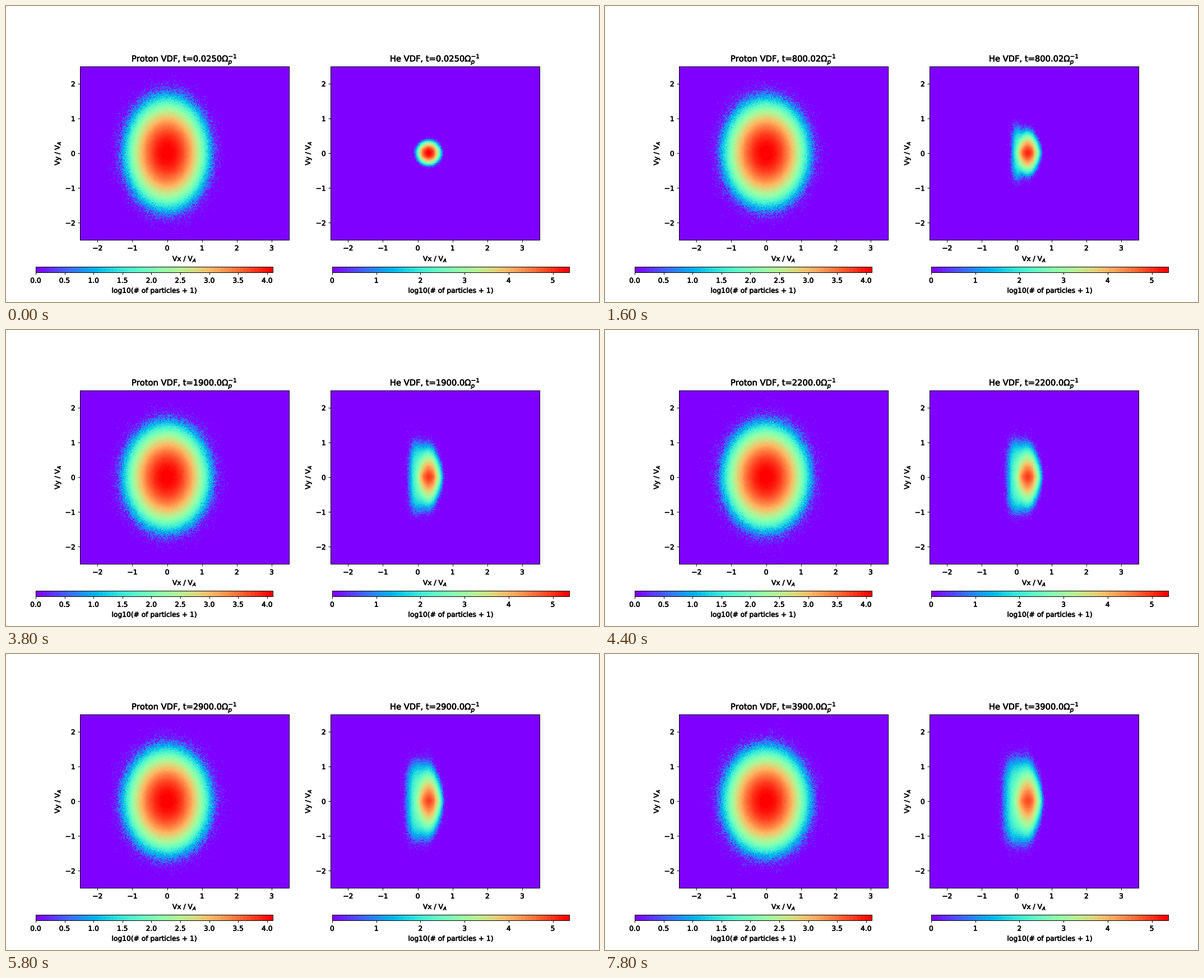
A matplotlib script for the animation above (8 s loop, 1058x529 px).

```python
import numpy as np
import matplotlib.pyplot as plt
from matplotlib import patheffects
from matplotlib.animation import FuncAnimation
from matplotlib.text import Text

W, H = 1058, 529
FRAMES, STEP_MS = 40, 200
BINS = 200
X_LIM, Y_LIM = (-2.5, 3.5), (-2.5, 2.5)

plt.rcParams.update({"font.family": "DejaVu Sans", "font.size": 10})


def centres(lo, hi):
    edges = np.linspace(lo, hi, BINS + 1)
    return (edges[:-1] + edges[1:]) / 2


VX, VY = np.meshgrid(centres(*X_LIM), centres(*Y_LIM))


def proton_density(t):
    """Bi-Maxwellian that relaxes slightly towards isotropy."""
    relax = 1 - np.exp(-t / 5)
    sx = 0.328 + 0.008 * relax
    sy = 0.440 - 0.022 * relax
    return 10**4.1 * np.exp(-VX**2 / (2 * sx**2) - VY**2 / (2 * sy**2))


def helium_density(t):
    """Drifting core that widens in vy and feeds a flat halo on its left."""
    u = VX - (0.315 + 0.0004 * t - 0.04 * VY**2 * min(t / 8, 1))
    sx = np.where(u > 0, 0.085 + 0.0004 * t, 0.085 + 0.0009 * t)
    spread = np.sqrt(0.0144 + 0.0012 * t)
    power = 1.4 + 0.6 * np.exp(-t / 5)
    peak = 10**5.375 / np.sqrt(1 + t / 4)
    core = peak * np.exp(-u**2 / (2 * sx**2) - (np.abs(VY) / spread) ** power)

    age = max(t, 0.1) / 39
    width = max(0.147 * age**0.45, 0.03)
    reach = 0.69 * age**0.26
    v = VX - (0.06 - 0.06 * VY**2)
    halo = 500 * (1 - np.exp(-t / 14)) * np.exp(
        -v**2 / (2 * width**2) - (np.abs(VY) / reach) ** 2.6)
    return core + halo


def log_counts(density, rng):
    return np.log10(rng.poisson(density) + 1)


class Panel:
    def __init__(self, name, density, left, bar_left, vmax, bar_ticks):
        self.name, self.density = name, density
        self.ax = fig.add_axes([left / W, 1 - 418.3 / H, 372.7 / W, 310.6 / H])
        self.image = self.ax.imshow(
            np.zeros((BINS, BINS)), extent=(*X_LIM, *Y_LIM), origin="lower",
            aspect="auto", interpolation="nearest", vmin=0, vmax=vmax,
            cmap=plt.get_cmap("rainbow", 64))
        self.ax.set_xticks(range(-2, 4))
        self.ax.set_yticks(range(-2, 3))
        self.ax.set_xlabel("Vx / V$_A$")
        self.ax.set_ylabel("Vy / V$_A$")
        self.title = self.ax.set_title("", fontsize=12)
        bar = fig.add_axes([bar_left, 0.1, 0.4, 0.02])
        fig.colorbar(self.image, cax=bar, orientation="horizontal",
                     ticks=bar_ticks, label="log10(# of particles + 1)")

    def draw(self, t, rng):
        clock = f"{100 * t + 0.025:.4f}"[:6]
        self.title.set_text(rf"{self.name} VDF, t={clock}$\Omega_p^{{-1}}$")
        self.image.set_data(log_counts(self.density(t), rng))


fig = plt.figure(figsize=(12, 6), dpi=H / 6, facecolor="white")
panels = [
    Panel("Proton", proton_density, 132.25, 0.05, 4.1, np.arange(0, 4.1, 0.5)),
    Panel("He", helium_density, 579.3, 0.55, 5.375, range(6)),
]

# A hairline outline gives the lettering its heavier weight.
for label in fig.findobj(Text):
    label.set_path_effects(
        [patheffects.withStroke(linewidth=0.5, foreground="black")])


def update(i):
    rng = np.random.default_rng(100 + i)
    for panel in panels:
        panel.draw(i, rng)
    return [a for p in panels for a in (p.image, p.title)]


anim = FuncAnimation(fig, update, frames=FRAMES, interval=STEP_MS,
                     init_func=lambda: update(0), repeat=True, repeat_delay=0)
plt.show()
```
